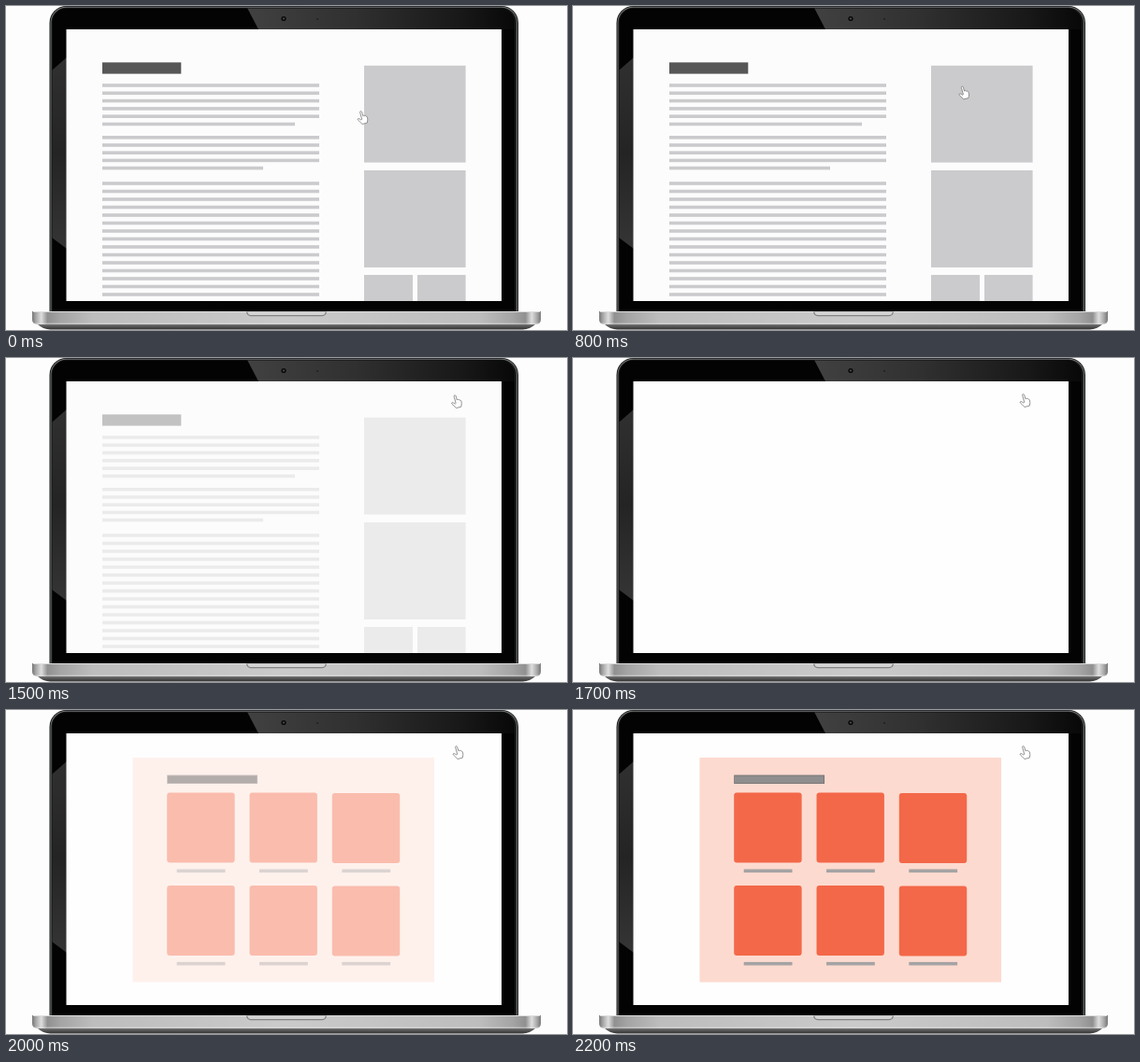
Animation, 600 px wide and 347 px high, one loop 2.3 s. Source, as an HTML page with a canvas:

```html
<!DOCTYPE html>
<html lang="en">
<head>
<meta charset="utf-8">
<title>Laptop page transition</title>
<style>
html, body { margin: 0; width: 100%; height: 100%; overflow: hidden; background: #fefdfe; }
canvas { display: block; width: 600px; height: 347px; }
</style>
</head>
<body>
<canvas id="stage"></canvas>
<script>
const W = 600, H = 347, LOOP = 2300, STEP = 100;
const canvas = document.getElementById('stage');
const ctx = canvas.getContext('2d');
const ratio = window.devicePixelRatio || 1;
canvas.width = W * ratio;
canvas.height = H * ratio;
ctx.scale(ratio, ratio);

// Values per 100 ms step, beginning at the given step
const travel = { from: 4, values: [0, .049, .14, .25, .36, .47, .578, .685, .784, .875, .945, .985, 1] };
const pageFade = { from: 12, values: [1, .9, .65, .35, .08, 0] };
const cardFade = { from: 17, values: [0, .05, .17, .39, .64, 1] };

function at(track, step) {
  const i = Math.min(Math.max(step - track.from, 0), track.values.length - 1);
  return track.values[i];
}

function box(x1, y1, x2, y2, color) {
  ctx.fillStyle = color;
  ctx.fillRect(x1, y1, x2 - x1, y2 - y1);
}

function round(x1, y1, x2, y2, r, color) {
  ctx.beginPath();
  ctx.roundRect(x1, y1, x2 - x1, y2 - y1, r);
  ctx.fillStyle = color;
  ctx.fill();
}

function poly(points, color) {
  ctx.beginPath();
  points.forEach(([x, y]) => ctx.lineTo(x, y));
  ctx.closePath();
  ctx.fillStyle = color;
  ctx.fill();
}

function dot(x, y, r, color) {
  ctx.beginPath();
  ctx.arc(x, y, r, 0, Math.PI * 2);
  ctx.fillStyle = color;
  ctx.fill();
}

function blend(x1, y1, x2, y2, stops) {
  const g = ctx.createLinearGradient(x1, y1, x2, y2);
  stops.forEach(([p, c]) => g.addColorStop(p, c));
  return g;
}

function lid() {
  round(46.5, 0, 548, 330, [18, 18, 0, 0], '#161718');
  round(47.5, .7, 547, 330, [17, 17, 0, 0], '#6d7071');
  round(48.5, 1.7, 546, 330, [16, 16, 0, 0], '#1b1c1c');
  round(49.5, 2.5, 544, 330, [15, 15, 0, 0], '#030303');

  // Glass reflections
  ctx.save();
  ctx.beginPath();
  ctx.roundRect(49.5, 2.5, 494.5, 324, [15, 15, 0, 0]);
  ctx.clip();
  poly([[258, 2], [544, 2], [544, 25], [270, 25]],
    blend(258, 0, 544, 0, [[0, '#414141'], [.4, '#303030'], [.8, '#181818'], [1, '#080808']]));
  poly([[49, 69], [65, 55], [65, 260], [49, 248]],
    blend(0, 55, 0, 260, [[0, '#303030'], [.5, '#242424'], [1, '#353535']]));
  ctx.restore();

  dot(297, 13.5, 2.6, '#080808');
  dot(297, 13.5, 1.1, '#4c5156');
  dot(333, 14, .8, '#111');
}

function base() {
  const shell = [0, 0, 20, 20];
  round(28, 327, 572, 346.5, shell,
    blend(0, 327, 0, 346.5, [[0, '#aaa9aa'], [.66, '#888788'], [.82, '#5a595a'], [1, '#303030']]));
  round(28, 327, 572, 341, [0, 0, 5, 5], blend(28, 0, 572, 0, [
    [0, '#777'], [.008, '#aaa'], [.018, '#dedede'], [.03, '#919091'], [.055, '#a5a4a5'],
    [.12, '#bebdbe'], [.5, '#cbcacb'], [.88, '#bebdbe'], [.945, '#a5a4a5'],
    [.97, '#919091'], [.982, '#dedede'], [.992, '#aaa'], [1, '#777']
  ]));
  box(29, 327, 571, 328, '#dedddf');
  box(30, 339.5, 570, 341, 'rgba(230,230,230,.45)');
  round(257, 327.5, 343, 332.2, [0, 0, 5, 5], '#858485');
  round(258.5, 327.5, 341.5, 331, [0, 0, 4, 4], '#d4d3d4');
}

function lines(y, count, gap, last) {
  for (let i = 0; i < count; i++) {
    const top = y + i * gap - 1.8;
    box(103, top, last && i === count - 1 ? last : 335, top + 3.6, '#cbcacc');
  }
}

function page() {
  box(103, 60.4, 187.3, 72.6, '#585758');
  lines(85, 6, 8.3, 309);
  lines(140.8, 5, 8.2, 275);
  lines(190, 15, 8.5);
  const tone = '#cbcacc';
  box(383, 63.8, 491.6, 167.6, tone);
  box(383, 176, 491.6, 280, tone);
  box(383, 288, 435, 316, tone);
  box(440, 288, 491.6, 316, tone);
}

function cards() {
  box(135.5, 51, 458, 291.5, '#fddacf');
  box(172.2, 69.6, 269, 79, '#747273');
  box(173, 70.5, 268.2, 78.2, '#8f8d8e');
  for (let row = 0; row < 2; row++) {
    for (let col = 0; col < 3; col++) {
      const x = 172.2 + col * 88.3;
      const y = 88.4 + row * 99.5 + (col === 2 ? .5 : 0);
      round(x, y, x + 72.4, y + 75, 3, '#f36849');
      box(x + 10.5, 170.5 + row * 99.4, x + 62.3, 174.1 + row * 99.4, '#a5a3a4');
    }
  }
}

function hand(x, y) {
  ctx.save();
  ctx.translate(x, y);
  ctx.beginPath();
  ctx.moveTo(5.2, 9.3);
  ctx.lineTo(3.2, 2.2);
  ctx.bezierCurveTo(2.8, .4, 4.7, .1, 5.2, 1.7);
  ctx.lineTo(6.3, 5.8);
  ctx.bezierCurveTo(7, 4.9, 7.9, 5.1, 8.2, 5.9);
  ctx.bezierCurveTo(8.9, 5.2, 9.6, 5.5, 9.9, 6.4);
  ctx.bezierCurveTo(10.8, 6.2, 11, 7, 11.1, 8);
  ctx.bezierCurveTo(11.5, 10.6, 11.1, 11.4, 10.7, 13.2);
  ctx.lineTo(5.5, 14.5);
  ctx.bezierCurveTo(4.2, 12.6, 2, 11.6, .8, 9.9);
  ctx.bezierCurveTo(.2, 8.7, 1.6, 8.1, 2.5, 8.9);
  ctx.lineTo(4.3, 10);
  ctx.closePath();
  ctx.fillStyle = '#fff';
  ctx.fill();
  ctx.lineWidth = .8;
  ctx.lineJoin = 'round';
  ctx.strokeStyle = '#777678';
  ctx.stroke();
  ctx.restore();
}

function layer(alpha, paint) {
  if (!alpha) return;
  ctx.globalAlpha = alpha;
  paint();
  ctx.globalAlpha = 1;
}

function draw(step) {
  box(0, 0, W, H, '#fefdfe');
  lid();
  base();
  box(64.5, 25, 530, 316, step < 17 ? '#fdfcfd' : '#fefefe');
  layer(at(pageFade, step), page);
  layer(at(cardFade, step), cards);
  const p = at(travel, step);
  hand(375.5 + 102 * p, 112 - 74 * p);
}

const start = performance.now();
function tick() {
  const t = (performance.now() - start) % LOOP;
  draw(Math.floor(t / STEP));
  requestAnimationFrame(tick);
}
tick();
</script>
</body>
</html>
```
